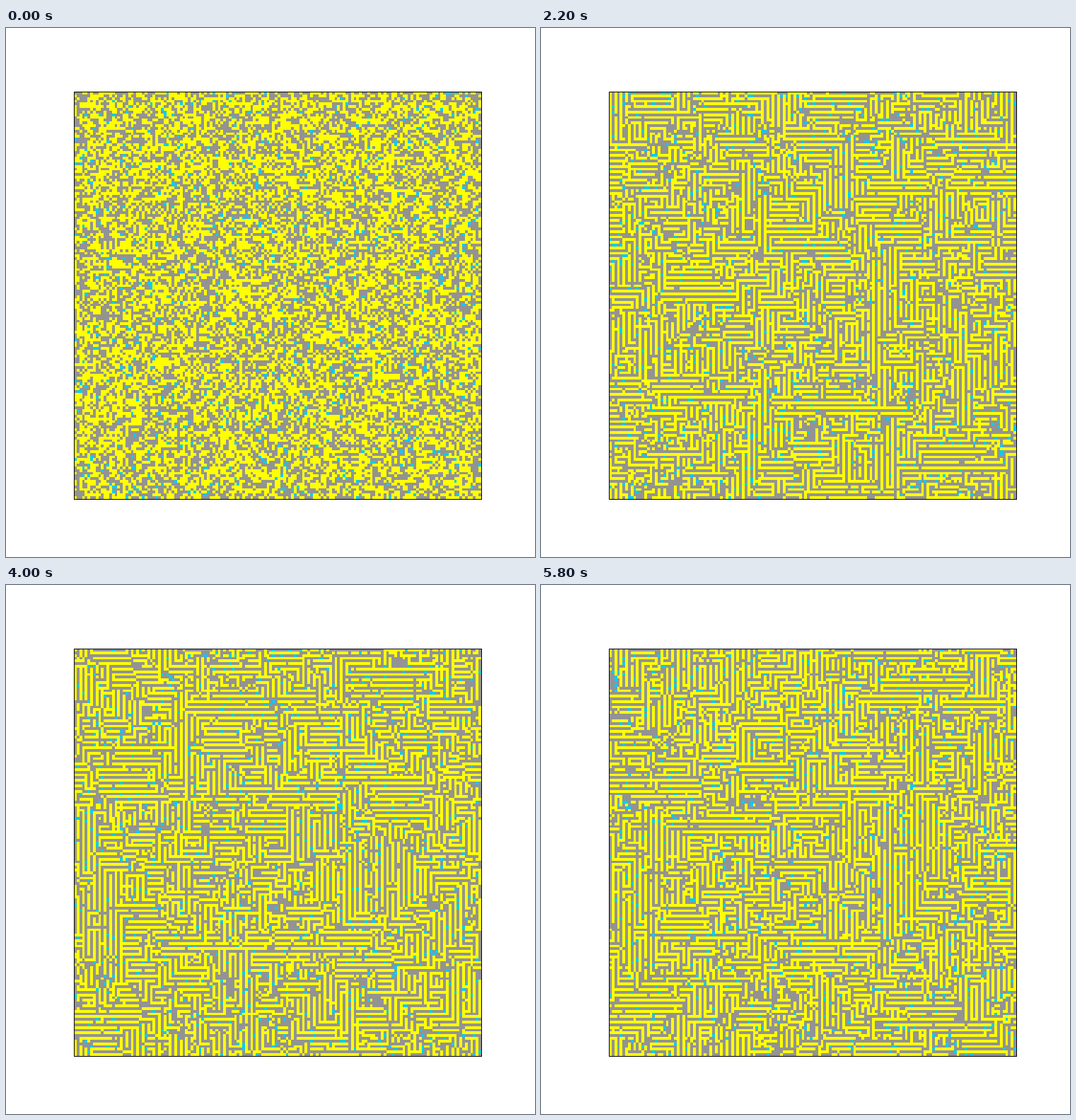
Recreate the animation shown at these times as a matplotlib script. Size 748x748 px, loop 6000 ms.

```python
import numpy as np
import matplotlib.pyplot as plt
from matplotlib.animation import FuncAnimation
from matplotlib.colors import ListedColormap

SIZE = 748
LEFT, TOP, SIDE = 96, 90, 576
N = 150
TICKS, STEP_MS = 30, 200
EMPTY, WALL, WALKER = 0, 1, 2
COLORS = ["#939393", "#ffff00", "#00ccff"]

DENSITY = 0.455
SIDE_GAIN = np.array([0, 2.5, 3.2, 0.5, -3.0])  # by count of side neighbours
DIAGONAL, SECOND, SHARPNESS = 1.0, 0.7, 1.5

rng = np.random.default_rng(7)


def count(grid, offsets):
    return sum(np.roll(grid, o, axis=(0, 1)) for o in offsets)


SIDES = [(1, 0), (-1, 0), (0, 1), (0, -1)]
CORNERS = [(1, 1), (1, -1), (-1, 1), (-1, -1)]
SECONDS = [(2 * a, 2 * b) for a, b in SIDES]


def relax(grid, level, rounds):
    """Grow thin walls with one-cell gaps while holding the density."""
    for _ in range(rounds):
        score = (SIDE_GAIN[count(grid, SIDES)]
                 - DIAGONAL * count(grid, CORNERS)
                 + SECOND * count(grid, SECONDS) + level)
        chance = 1 / (1 + np.exp(-SHARPNESS * score))
        chosen = rng.random((N, N)) < 0.12
        grid = np.where(chosen, rng.random((N, N)) < chance, grid).astype(int)
        level = np.clip(level + 0.5 * (DENSITY - grid.mean()), -4.0, -2.4)
    return grid, level


def stir(grid):
    hit = rng.random((N, N)) < 0.35
    return np.where(hit, rng.random((N, N)) < 0.25, grid).astype(int)


def with_walkers(grid):
    free = (grid == EMPTY) & (rng.random((N, N)) < 0.058)
    return np.where(free, WALKER, grid)


def simulate():
    grid = (rng.random((N, N)) < 0.51).astype(int)
    states, level = [with_walkers(grid)], -3.0
    for k in range(TICKS - 2):
        if k:
            grid = stir(grid)
        grid, level = relax(grid, level, 26)
        states.append(with_walkers(grid))
    return states


states = simulate()

fig = plt.figure(figsize=(SIZE / 100, SIZE / 100), dpi=100, facecolor="white")
ax = fig.add_axes([LEFT / SIZE, (SIZE - TOP - SIDE) / SIZE,
                   SIDE / SIZE, SIDE / SIZE])
ax.set_xticks([])
ax.set_yticks([])
for spine in ax.spines.values():
    spine.set_linewidth(0.72)
image = ax.imshow(states[0], cmap=ListedColormap(COLORS), vmin=0, vmax=2,
                  interpolation="nearest", aspect="auto")


def draw(tick):
    image.set_data(states[max(tick - 1, 0)])
    return [image]


anim = FuncAnimation(fig, draw, frames=TICKS, interval=STEP_MS,
                     repeat=True, repeat_delay=0, blit=False)
plt.show()
```
